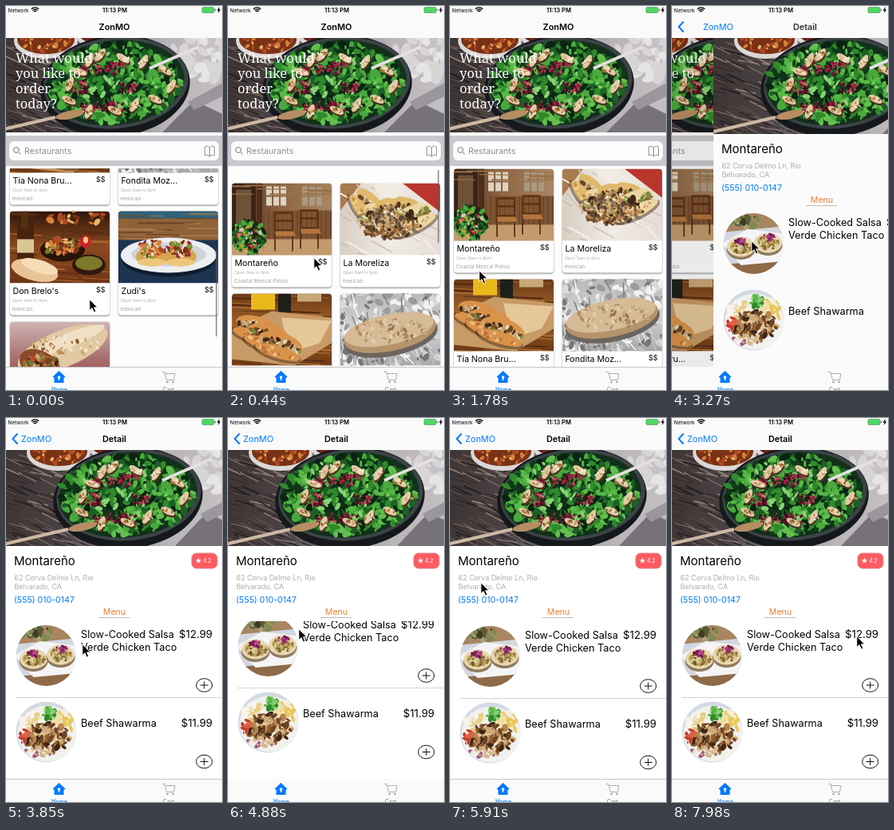
Write an HTML page with a canvas that moves like this. It is 271 by 480 pixels and loops after 8 s.

```html
<!DOCTYPE html>
<html lang="en">
<head>
<meta charset="utf-8">
<title>Food ordering app</title>
<style>
html, body { margin: 0; width: 100%; height: 100%; overflow: hidden; background: #fff; }
canvas { display: block; width: 100vw; height: 100vh; }
</style>
</head>
<body>
<canvas id="stage"></canvas>
<script>
const W = 271, H = 480, LOOP = 8000, STEP = 147.9;
const SANS = 'Inter, "Open Sans", sans-serif';
const BLUE = '#007aff', GREY = '#8e8e93';
const stage = document.getElementById('stage');
const dpr = window.devicePixelRatio || 1;
stage.width = W * dpr;
stage.height = H * dpr;
const g = stage.getContext('2d');

// Pointer stops: [step, x, y]
const STOPS = [[0, 104, 366], [3, 107, 314], [8, 123, 330], [13, 14, 330], [16, 104, 328], [18, 99, 293],
  [22, 99, 293], [33, 88, 263], [40, 38, 205], [44, 108, 266], [52, 172, 303], [54, 231, 272]];

function pointerAt(i) {
  const n = Math.max(1, STOPS.findIndex(s => s[0] >= i));
  const [a, x, y] = STOPS[n - 1], [b, u, v] = STOPS[n];
  const k = (i - a) / (b - a);
  return [x + (u - x) * k, y + (v - y) * k];
}

// Flick to the top, overshoot, settle
function listScroll(i) {
  const k = Math.min(1, i / 3);
  return i < 3 ? 223 - 241 * k * (2 - k) : Math.round(-18 * .55 ** (i - 3));
}

function pushAt(i) {
  const k = Math.max(0, i - 20), p = 1 - Math.exp(-.415 * k * k);
  return p > .99 ? 1 : p;
}

// Drag up, then a damped swing back
function menuScroll(i) {
  if (i < 29) return 0;
  return Math.round(12 * Math.sin((i - 29) * Math.PI / 8) * Math.exp(-.35 * Math.max(0, i - 33)));
}

function random(seed) {
  return () => (seed = (seed * 16807) % 2147483647) / 2147483647;
}

function box(x, y, w, h, c) {
  g.fillStyle = c;
  g.fillRect(x, y, w, h);
}

function fade(w, h, turn, ...colors) {
  const grad = g.createLinearGradient(0, 0, turn ? 0 : w, turn ? h : 0);
  colors.forEach((c, n) => grad.addColorStop(n / (colors.length - 1), c));
  box(0, 0, w, h, grad);
}

function round(x, y, w, h, r, c) {
  g.beginPath();
  g.roundRect(x, y, w, h, r);
  g.fillStyle = c;
  g.fill();
}

function oval(x, y, rx, ry, c, turn = 0) {
  g.beginPath();
  g.ellipse(x, y, rx, ry, turn, 0, 7);
  g.fillStyle = c;
  g.fill();
}

function outline(c, w) {
  g.strokeStyle = c;
  g.lineWidth = w;
  g.stroke();
}

function trace(p) {
  g.beginPath();
  for (let i = 0; i < p.length; i += 2) g.lineTo(p[i], p[i + 1]);
}

function line(c, w, ...p) {
  trace(p);
  outline(c, w);
}

function poly(c, ...p) {
  trace(p);
  g.closePath();
  g.fillStyle = c;
  g.fill();
}

function text(s, x, y, size, c = '#000', weight = 400, align = 'left', family = SANS) {
  g.font = `${weight} ${size}px ${family}`;
  g.textAlign = align;
  g.fillStyle = c;
  g.fillText(s, x, y);
}

// Scatter small ovals inside a larger oval
function bits(seed, n, x, y, rx, ry, size, colors) {
  const r = random(seed * 7919);
  for (let i = 0; i < n; i++) {
    const a = r() * 6.28, d = Math.sqrt(r()), s = size * (.5 + r() * .7);
    oval(x + Math.cos(a) * d * rx, y + Math.sin(a) * d * ry, s, s * (.35 + r() * .4),
      colors[Math.floor(r() * colors.length)], r() * 3);
  }
}

// Wood grain or foil creases
function grain(seed, n, w, h, long, tilt, colors) {
  const r = random(seed * 7919);
  for (let i = 0; i < n; i++) {
    const x = r() * w - long / 2, y = r() * h, a = tilt * (r() + .5);
    line(colors[i % colors.length], .5 + r() * 1.5, x, y, x + long * Math.cos(a), y + long * Math.sin(a));
  }
}

const LEAF = ['#2f8a2c', '#4aa83c', '#0f3a18', '#63bf4e', '#1d5f26', '#0b2412'];
const SHINE = ['#58b846', '#8bd176', '#2f8a2c'];
const MEAT = ['#6e4523', '#8d5d31', '#b58650', '#3f2715', '#d0aa78'];
const BEAN = ['#7a1030', '#a51c40', '#3f0a1a', '#c4405e'];
const TOAST = ['#b98a55', '#f3e6cc', '#c9a876', '#8a5a2c'];
const WOOD = ['#1f1c20', '#6b5a52', '#38302f', '#90807a'];
const SPICE = ['#d9803a', '#b04a22', '#e8b768', '#7a3216'];

function clipped(x, y, path, draw) {
  g.save();
  g.translate(x, y);
  g.beginPath();
  path();
  g.clip();
  draw();
  g.restore();
}

function bowl(seed, x, y, rx, ry, colors) {
  oval(x, y, rx, ry, '#dcd8d8');
  oval(x, y - 2, rx - 4, ry - 4, colors[3]);
  bits(seed, rx * 2, x, y - 2, rx - 6, ry - 6, 3, colors);
}

function salad(x, y, h, shift) {
  clipped(x, y, () => g.rect(0, 0, W, h), () => {
    fade(W, h, false, '#3f3635', '#4a4143', '#8f8a90', '#b9b4b8', '#c4bfc1');
    grain(2, 150, 100 + shift, h, 26, .35, WOOD);
    g.translate(shift, 0);
    bits(9, 60, 245, 25, 40, 30, 9, ['#d8d5d6', '#e6e4e4', '#c6c1c4']);
    poly('#77727a', 196, h, 236, 78, 290, 104, 290, h);
    poly('#9b969c', 228, 80, 290, 46, 290, 64, 236, 90);
    bowl(3, 50, 4, 40, 22, SPICE);
    bowl(5, 112, -3, 24, 15, ['#9c2e22', '#c9694a', '#702018', '#5b2018']);
    oval(137, 60, 94, 63, '#16191c', -.1);
    oval(138, 56, 91, 57, '#3b4347', -.1);
    oval(137, 56, 87, 53, '#12301a', -.1);
    bits(7, 420, 136, 56, 83, 49, 7, LEAF);
    bits(8, 120, 136, 52, 78, 44, 4.5, SHINE);
    for (let n = 0; n < 6; n++) {
      const a = n * 1.05;
      bits(20 + n, 34, 122 + Math.cos(a) * 30, 62 + Math.sin(a) * 28, 14, 8, 2.3, BEAN);
    }
    for (let n = 0; n < 13; n++) {
      const a = n * .5 - 1.9, d = .74 + .12 * Math.sin(n * 5);
      const u = 138 + Math.cos(a) * 82 * d, v = 56 + Math.sin(a) * 50 * d, t = a + 1 + n % 3;
      oval(u + 1, v + 2, 10, 4.5, '#4c351f', t);
      oval(u, v, 9.5, 4, '#e2cba4', t);
      bits(40 + n, 9, u, v, 8, 3, 2.2, TOAST);
    }
    line('#e4e0de', 4, 180, 38, 242, 11);
    line('#cdb9a4', 4, -20, 118, 62, 99);
    oval(80, 96, 18, 5, '#b78d63', -.2);
  });
}

function chair(x, y) {
  const c = '#5a3015';
  for (let n = 0; n < 5; n++) line(n % 4 ? '#8a5428' : c, 1.8, x + n * 5.5, y, x + n * 5.5, y + (n % 4 ? 20 : 48));
  for (const v of [0, 10, 22]) line(c, 2.5, x, y + v, x + 22, y + v);
  poly('#b4763c', x, y + 23, x + 23, y + 23, x + 26, y + 29, x + 1, y + 29);
}

function taco(seed, x, y, s, t, shell) {
  g.save();
  g.translate(x, y);
  g.rotate(t);
  g.scale(s, s);
  oval(0, 12, 33, 10, 'rgba(60,30,10,.45)');
  oval(0, -3, 30, 13, shell);
  bits(seed, 70, 0, 0, 26, 7, 4, [...MEAT, '#e4d5b0', '#6f8f3b']);
  oval(0, 10, 31, 8, shell);
  bits(seed + 1, 16, 0, 10, 26, 5, 3, ['rgba(150,80,25,.45)', 'rgba(255,235,190,.5)']);
  g.restore();
}

const PHOTOS = [
  () => {
    fade(125, 90, false, '#4f3321', '#8d6645', '#a98663');
    box(0, 0, 30, 62, '#3a2417');
    box(5, 8, 19, 42, '#6e5237');
    for (let n = 0; n < 12; n++) {
      const x = 43 + n % 6 * 9 + (n % 6 > 2 ? 18 : 0);
      box(x, n < 6 ? 4 : 17, 7, 11, n % 6 > 2 ? '#a99a80' : '#ddd3c0');
    }
    box(31, 0, 7, 70, '#4a2d1a');
    box(38, 34, 87, 36, '#7d5433');
    for (let n = 0; n < 15; n++) line('#5e3c22', .8, 40 + n * 6, 35, 40 + n * 6, 70);
    box(0, 70, 125, 20, '#c39a6c');
    grain(60, 14, 125, 14, 40, .01, ['#9a7148']);
    box(0, 62, 30, 10, '#6f4a2c');
    chair(54, 37);
    chair(86, 34);
    bits(61, 140, 20, 68, 22, 21, 4, [...LEAF, '#2a2416']);
    bits(62, 40, 18, 68, 19, 17, 2.4, ['#b8242f', '#d9566a', '#d79a2e', '#d8c0bd']);
  },
  () => {
    fade(125, 90, false, '#d9cfc2', '#f0ebe4', '#e6ded6');
    poly('#b9362c', 78, 0, 125, 0, 125, 36);
    poly('#a97a4c', 0, 0, 26, 0, 0, 34);
    grain(70, 30, 125, 90, 30, .6, ['#faf7f2', '#c9bfb4']);
    for (let n = 0; n < 4; n++) taco(71 + n * 2, 38 + n * 17, 32 + n % 2 * 12, .95, .9 - n * .45, n % 2 ? '#ecd6a4' : '#dfb86a');
    bits(79, 170, 62, 50, 40, 18, 4, [...MEAT, '#5b4a3c', '#8a7660']);
    bits(80, 24, 62, 44, 34, 14, 2.5, ['#e9e3d6', '#7ea045', '#c9b48c']);
    oval(58, 10, 16, 7, '#f1ece2', .4);
  },
  () => {
    fade(125, 90, true, '#6b3a16', '#a8662c', '#6a3814');
    grain(81, 40, 125, 90, 50, .05, ['#4a260f', '#b87838']);
    box(24, 0, 30, 20, '#e9b91c');
    box(58, 0, 16, 24, '#1e1f1a');
    box(82, 0, 30, 10, '#c7a878');
    poly('#c79a66', 0, 46, 50, 22, 125, 30, 125, 62, 78, 90, 0, 82);
    poly('#e6c798', 62, 30, 125, 34, 110, 62, 72, 74);
    for (let n = 0; n < 3; n++) taco(82 + n * 2, 32 + n * 14, 44 + n * 10, .95, .3, '#d9924a');
  },
  () => {
    fade(125, 90, true, '#b9b9ba', '#d2d2d3', '#a7a7a9');
    bits(91, 260, 62, 45, 85, 62, 6, ['#d9d9da', '#9b9b9e', '#f2f2f2', '#bdbdbf', '#77777a']);
    grain(92, 90, 125, 90, 18, 1.2, ['#f6f6f6', '#87878a', '#c9c9cb']);
    oval(63, 54, 60, 24, '#6c655e', -.2);
    oval(62, 49, 59, 23, '#b5946c', -.2);
    oval(61, 45, 57, 19, '#d6bb97', -.2);
    bits(93, 80, 62, 46, 50, 16, 3, ['#b08c64', '#e3ceb0', '#c5a680', '#9a744c']);
  },
  () => {
    fade(125, 90, true, '#2d150a', '#8a4a20', '#6d3516');
    grain(100, 30, 125, 90, 45, .05, ['#5b2c12', '#a8622c']);
    bits(101, 20, 85, 8, 40, 8, 5, SPICE);
    round(9, 13, 21, 58, 5, '#47230e');
    box(14, 0, 9, 22, '#55300f');
    box(9, 35, 21, 17, '#d8c795');
    oval(66, 48, 28, 15, '#2a130a');
    bits(102, 80, 66, 44, 23, 10, 4, [...SPICE, '#6f7a2c']);
    oval(95, 38, 7, 8, '#c92030');
    oval(95, 36, 3, 4, '#ffcf73');
    oval(99, 67, 21, 13, '#30180d');
    oval(99, 65, 17, 9, '#7c7a2a');
    oval(31, 74, 30, 13, '#e9c296', .25);
    oval(37, 69, 24, 8, '#f6dcb7', .3);
  },
  () => {
    box(0, 0, 125, 90, '#1d3450');
    box(0, 0, 125, 36, '#8f6238');
    box(0, 0, 125, 9, '#2f637d');
    grain(110, 20, 125, 36, 60, .01, ['#6c4526', '#a9794a']);
    oval(63, 60, 59, 22, '#101c2c');
    oval(63, 55, 60, 22, '#eceef1');
    oval(63, 54, 47, 15, '#cfd4da');
    for (const x of [42, 78]) {
      oval(x, 57, 20, 12, '#d6a550');
      bits(x, 70, x, 47, 16, 10, 3.5, [...SPICE, '#6f9b38', '#eedfbd', '#8e2e47']);
      oval(x, 64, 18, 5, '#edc67b');
    }
  },
  () => {
    fade(125, 90, true, '#d0b5b4', '#a86f70', '#8d3e3d');
    oval(66, 34, 60, 23, '#e3c9a3', -.38);
    oval(72, 24, 50, 9, '#f0dfc3', -.38);
    bits(121, 50, 70, 29, 45, 13, 3, TOAST);
    oval(38, 55, 28, 18, '#8b4a28', .5);
    bits(122, 90, 38, 55, 23, 14, 4, [...MEAT, '#b84b2b', '#64833a']);
  }
];

const CARDS = [
  ['Montareño', 'Coastal Mezcal Patios'], ['La Moreliza', 'mexican'],
  ['Tía Nona Bru...', 'mexican'], ['Fondita Moz...', 'mexican'],
  ['Don Brelo\'s', 'mexican'], ['Zudi\'s', 'mexican'], ['Rolla Verbo', 'mexican']
];

function card(n, x, y) {
  g.save();
  g.shadowColor = 'rgba(0,0,0,.5)';
  g.shadowBlur = 2 * dpr;
  g.shadowOffsetY = dpr;
  round(x, y, 125, 130, 4, '#fff');
  g.restore();
  clipped(x, y, () => g.roundRect(0, 0, 125, 90, [4, 4, 0, 0]), PHOTOS[n]);
  text(CARDS[n][0], x + 3.5, y + 103.7, 10.6);
  text('$$', x + 108, y + 101.5, 9, '#222', 500);
  text('Open 9am to 9pm', x + 3, y + 113.2, 5.2, '#b0b0b0');
  text(CARDS[n][1], x + 2.5, y + 124.2, 6.5, '#a2a2a2');
}

function home(scroll, i) {
  box(0, 40, W, 411, '#fdfdfd');
  salad(0, 40, 118, 0);
  ['What would', 'you like to', 'order', 'today?'].forEach((s, n) =>
    text(s, 12, 70.5 + n * 19, 16.5, '#fff', 400, 'left', '"Noto Serif", serif'));

  box(0, 162, W, 38, '#c9c8cd');
  round(4, 169, 263, 24, 6, '#fcfcfc');
  g.beginPath();
  g.arc(13, 180, 3.4, 0, 7);
  outline('#777', 1);
  line('#777', 1, 15.5, 182.5, 18.5, 185.5);
  text('Restaurants', 23, 185, 10.6, GREY);
  for (const d of [-1, 1])
    line('#8a8a8a', .9, 255.5, 177, 255.5 + 3 * d, 175, 255.5 + 6 * d, 176, 255.5 + 6 * d, 187, 255.5 + 3 * d, 186, 255.5, 188, 255.5, 177);

  clipped(0, 0, () => g.rect(0, 203, W, 248), () => {
    CARDS.forEach((_, n) => card(n, n % 2 ? 141 : 5, 203.5 + (n >> 1) * 138 - scroll));
    if (i < 8) round(263, 205 + Math.max(0, scroll) * .445, 2, 109 + Math.min(0, scroll), 1, 'rgba(90,90,95,.55)');
  });
}

function tacosDish() {
  box(-40, -40, 80, 80, '#d3d7e0');
  poly('#a98560', -40, -40, 40, -40, 40, -22, -40, -14);
  bits(130, 40, -14, -28, 22, 9, 5, ['#3f3a22', '#7d8a50', '#5b5a38', '#a9a47c']);
  poly('#8f6a48', -40, 26, 40, 20, 40, 40, -40, 40);
  poly('#f4f4f6', -40, 0, -8, -18, 40, -12, 38, 22, -16, 27);
  [-16, 18].forEach((x, n) => {
    const y = 4 - n * 5;
    oval(x, y + 3, 18, 13, '#8f7a5c');
    oval(x, y, 17.5, 12.5, '#ead7b0');
    bits(131 + n, 70, x, y, 13, 8, 3, ['#8f7338', '#c0a45c', '#6b5426', '#d9cb95']);
    bits(141 + n, 22, x + 1, y - 7, 7, 4, 2.6, ['#8b2467', '#b53d88', '#611648']);
  });
}

function meatDish() {
  box(-40, -40, 80, 80, '#d3dae4');
  oval(1, 2, 37, 35, '#f1f1ee');
  bits(151, 36, -17, -13, 14, 12, 5, ['#efe6d6', '#e6ce83', '#f8f4ec']);
  bits(152, 30, 20, -12, 13, 14, 5, ['#e9c75a', '#f0dfa6', '#f4efdf']);
  bits(153, 190, 2, 7, 28, 18, 4.5, [...MEAT, '#e2c597']);
  bits(154, 16, -28, 5, 5, 11, 4, ['#c63b2c', '#dc6245']);
  bits(155, 18, 5, -22, 8, 9, 4.5, SHINE);
  bits(156, 24, -8, 25, 18, 5, 3.5, ['#efe5d2', '#a05a80', '#d1b78e']);
}

function dish(y, lines, price, draw) {
  const base = y + (lines.length > 1 ? 20.5 : 36.5);
  clipped(50.5, y + 43, () => g.arc(0, 0, 38, 0, 7), draw);
  lines.forEach((s, n) => text(s, 94, base + n * 16.3, 12.7));
  text(price, 259, base, 13.2, '#000', 400, 'right');
  g.beginPath();
  g.ellipse(248.7, y + 80, 10, 8.3, 0, 0, 7);
  outline('#111', 1);
  line('#111', 1, 243.7, y + 80, 253.7, y + 80);
  line('#111', 1, 248.7, y + 75.5, 248.7, y + 84.5);
}

function detail(scroll, settled) {
  box(0, 40, W, 411, settled ? '#fff' : '#fbfbfb');
  salad(0, 40, 120, 16);
  text('Montareño', 10, 183.5, 15);
  round(233, 169, 32, 19, 6, '#ff5a5f');
  outline('#d98a8c', 1);
  const star = [];
  for (let n = 0; n < 10; n++) {
    const a = n * Math.PI / 5 - Math.PI / 2, r = n % 2 ? 1.6 : 4;
    star.push(241.5 + Math.cos(a) * r, 178.5 + Math.sin(a) * r);
  }
  poly('#fff', ...star);
  text('4.2', 247, 181.3, 7, '#fff');
  text('62 Corva Delmo Ln, Rio', 10.5, 202.5, 9, '#999', 300);
  text('Belvarado, CA', 10.5, 213.5, 9, '#999', 300);
  text('(555) 010-0147', 10, 231, 10.6, BLUE);
  text('Menu', 136, 246, 10.6, '#ed7d31', 400, 'center');
  box(116, 249, 39, 1, '#c9b7a8');
  clipped(0, 0, () => g.rect(0, 254, W, 197), () => {
    const y = 254 - scroll;
    dish(y, ['Slow-Cooked Salsa', 'Verde Chicken Taco'], '$12.99', tacosDish);
    if (settled) box(12, y + 95, W, 1, '#d4d4d6');
    dish(y + 95.5, ['Beef Shawarma'], '$11.99', meatDish);
  });
}

function header(p) {
  box(0, 0, W, 40, '#fafafa');
  text('Network', 2.5, 7.7, 6.5);
  for (const r of [2.2, 4.4, 6.6]) {
    g.beginPath();
    g.arc(36.5, 8.5, r, -2.36, -.78);
    outline('#000', 1.4);
  }
  text('11:13 PM', 136.5, 7.8, 7.7, '#000', 600, 'center');
  round(246, 1.5, 15, 7, 1.5, '#4cd964');
  outline('#55845c', .6);
  box(261.8, 3.6, 1, 2.8, '#555');
  poly('#000', 268, 1, 264.5, 5.6, 266.6, 5.6, 265.8, 9, 269.3, 4.4, 267.2, 4.4);

  g.globalAlpha = Math.max(0, 1 - 2 * p);
  text('ZonMO', 136 - 60 * p, 30, 10.9, '#000', 600, 'center');
  g.globalAlpha = Math.min(1, 2 * p);
  text('ZonMO', 19 + 105 * (1 - p), 30, 10.9, BLUE);
  line(BLUE, 2, 14.5, 19.5, 8.5, 26, 14.5, 32.5);
  g.globalAlpha = p;
  text('Detail', 136 + 163 * (1 - p), 30, 10.8, '#000', 600, 'center');
  g.globalAlpha = 1;
}

function tabs(bar) {
  box(0, 451, W, 29, '#fafafa');
  if (bar) box(0, 451, W, 1, '#c6c6c8');
  poly(BLUE, 58.5, 463.5, 66.5, 456, 74.5, 463.5, 72.5, 465, 72.5, 471, 60.5, 471, 60.5, 465);
  oval(66.5, 464, 1.8, 1.8, '#fff');
  box(65.8, 464, 1.4, 4, '#fff');
  text('Home', 67, 482, 7, BLUE, 500, 'center');
  const c = '#a4a4a9';
  line(c, .9, 196, 457.5, 199, 457.5, 201.5, 467.5, 210.5, 467.5, 212, 459.5, 199.5, 459.5);
  for (const x of [202.5, 209.5]) oval(x, 470, 1.3, 1.3, c);
  text('Cart', 204, 482, 7, GREY, 500, 'center');
}

function pointer(x, y) {
  g.save();
  g.translate(x, y);
  poly('#000', .8, .8, .8, 14.6, 4, 11.6, 6.4, 17, 8.8, 16, 6.5, 10.8, 11, 10.8);
  outline('#fff', 1);
  g.restore();
}

function draw(i) {
  const p = pushAt(i), drag = menuScroll(i);
  g.setTransform(dpr, 0, 0, dpr, 0, 0);
  box(0, 0, W, H, '#fff');
  if (p < 1) {
    g.save();
    g.translate(-.3 * W * p, 0);
    home(listScroll(i), i);
    g.restore();
    box(0, 40, W, 411, `rgba(0,0,0,${.1 * p})`);
  }
  if (p > 0) {
    g.save();
    g.translate(Math.round(W * (1 - p)), 0);
    detail(drag, p === 1);
    g.restore();
  }
  header(p);
  tabs((p === 0 || p === 1) && drag <= 0);
  pointer(...pointerAt(i));
}

// The screen refreshes in even steps
let last = -1;
function tick() {
  const i = Math.floor((performance.now() % LOOP + 8) / STEP);
  if (i !== last) draw(last = i);
  requestAnimationFrame(tick);
}
tick();
</script>
</body>
</html>
```
